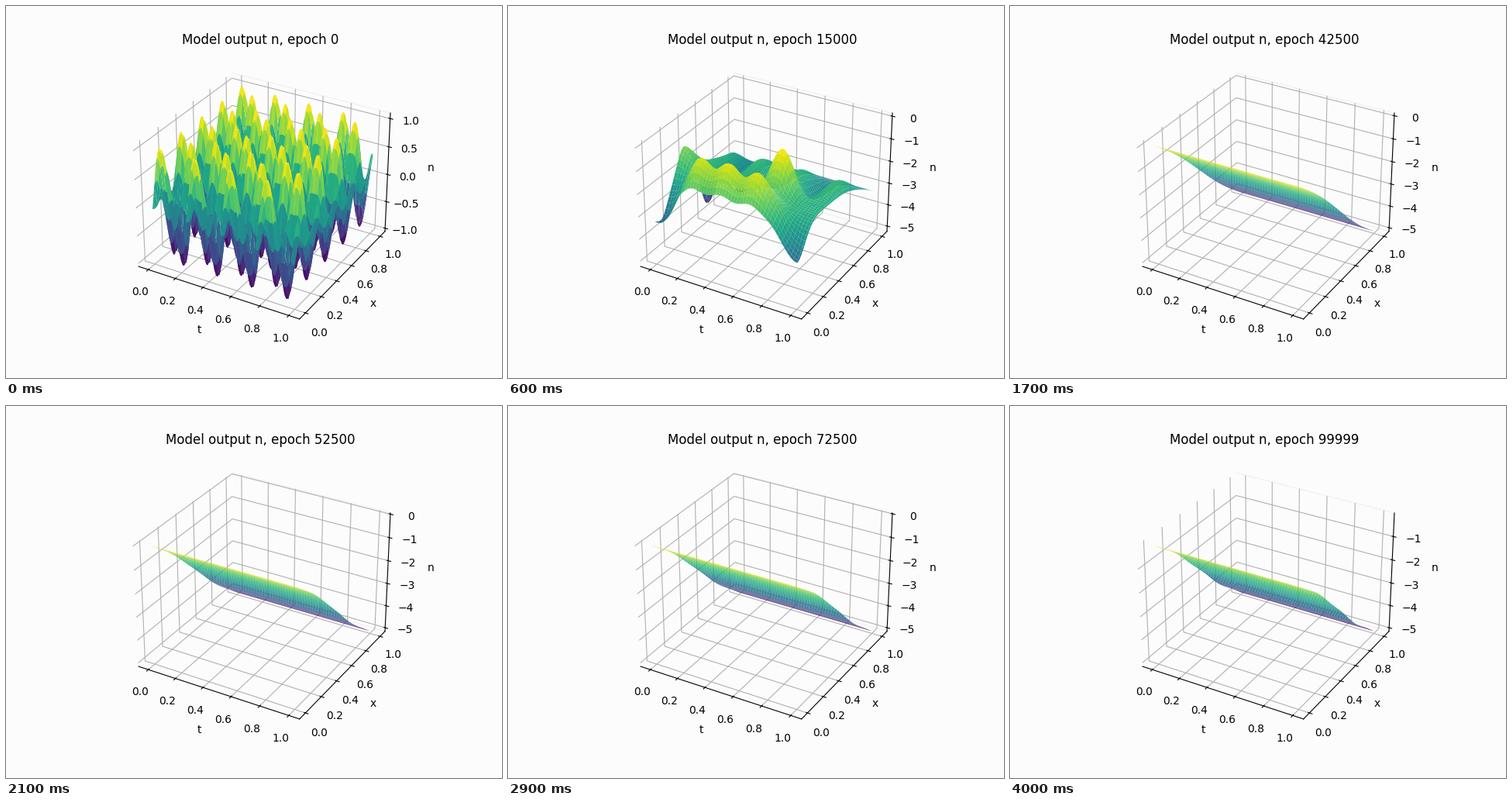
These frames come from a looping animation (640x480 px, 4.1 s). A matplotlib script:

```python
import numpy as np
import matplotlib.pyplot as plt
from matplotlib.animation import FuncAnimation

FRAMES, INTERVAL = 41, 100
EPOCHS_PER_FRAME, LAST_EPOCH = 2500, 99999
BACKGROUND = "#fcfcfc"
VIEW_MARGIN = 1 / 48
SETTLED = 17  # from here on only small drifts remain

t, x = np.meshgrid(np.linspace(0, 1, 100), np.linspace(0, 1, 100))


def wave(v, peak, period):
    return np.cos(2 * np.pi * (v - peak) / period)


def bump(tc, xc, width=0.1):
    return np.exp(-((t - tc) ** 2 + (x - xc) ** 2) / width ** 2)


def rescale(z, low, high):
    return low + (high - low) * (z - z.min()) / np.ptp(z)


def waves():
    """Untrained output: a grid of peaks, slightly skewed."""
    along_t = wave(t, 0.065, 0.245)
    return rescale(along_t * wave(x, 0.028 - 0.02 * along_t, 0.24), -1.015, 1.054)


def hills():
    """A crested ridge in front, a row of low hills behind, sunken corners."""
    window = np.exp(-((t - 0.48) / 0.34) ** 6)
    ridge = window * (1.45 + 0.2 * wave(t, 0.27, 0.205)) * np.exp(-((x - 0.1) / 0.1) ** 2)
    back = 0.5 * wave(t, 0.13, 0.27) * np.exp(-((x - 0.6) / 0.18) ** 2)
    corners = -1.6 * bump(0, 0.05, 0.14) - 1.3 * bump(1, 0, 0.13) - 1.85 * bump(0, 1, 0.15)
    peaks = bump(0, 0.35) - 1.7 * bump(0, 0.6) + 1.9 * bump(0.7, 0.35)
    return rescale(-1.9 - 1.4 * x ** 3 + ridge + back + corners + peaks, -5.14, 0.03)


def slope():
    """Nearly the final ramp, still wavy along its upper edge."""
    ramp = -0.5 - 4.75 * x + 0.2 * np.sin(2 * np.pi * x)
    edge = (0.1 + 0.55 * t + 0.42 * wave(t, 0.15, 0.53)) * np.exp(-(x / 0.2) ** 2)
    fold = 0.5 * t ** 4 * wave(x, 0.57, 0.4) * np.sin(np.pi * x)
    ripple = 0.2 * wave(t, 0.05, 0.3) * np.sin(np.pi * x) ** 2
    return rescale(ramp + edge + fold + ripple, -5.5, 0.77)


def settled(step):
    drift = wave(step, SETTLED, 16.5)
    ripple = 0.014 * (1 - drift) * wave(x, 0.22, 1 / 3)
    ramp = -4.95 * x + (0.13 - 0.015 * drift) * np.sin(2 * np.pi * x)
    return rescale(ramp + ripple, -5.06, -0.06 + 0.07 * drift)


STAGES = [(0, waves()), (6, hills()), (10, slope()), (SETTLED, settled(SETTLED))]


def surface_at(step):
    for (start, a), (end, b) in zip(STAGES, STAGES[1:]):
        if step <= end:
            u = (step - start) / (end - start)
            return b + (a - b) * (1 - u) ** 2
    return settled(step)


fig = plt.figure(figsize=(6.4, 4.8), dpi=100, facecolor=BACKGROUND)
ax = fig.add_subplot(projection="3d", facecolor=BACKGROUND)
pad = 0.05 + 1.1 * VIEW_MARGIN
ax.set(xlim=(-pad, 1 + pad), ylim=(-pad, 1 + pad),
       xlabel="t", ylabel="x", zlabel="n")
ax.locator_params(axis="z", nbins=8)
for axis, edge in ((ax.xaxis, "none"), (ax.yaxis, "#f2f2f2"), (ax.zaxis, "none")):
    axis.pane.set_alpha(None)
    axis.pane.set_facecolor("none")
    axis.pane.set_edgecolor(edge)


def update(step):
    for old in list(ax.collections):
        old.remove()
    z = surface_at(step)
    ax.plot_surface(t, x, z, cmap="viridis")
    margin = np.ptp(z) * VIEW_MARGIN
    ax.set_zlim(z.min() - margin, z.max() + margin)
    epoch = min(step * EPOCHS_PER_FRAME, LAST_EPOCH)
    ax.set_title(f"Model output n, epoch {epoch}")
    return []


anim = FuncAnimation(fig, update, frames=FRAMES, interval=INTERVAL,
                     init_func=lambda: [], repeat=True, repeat_delay=0)
plt.show()
```
